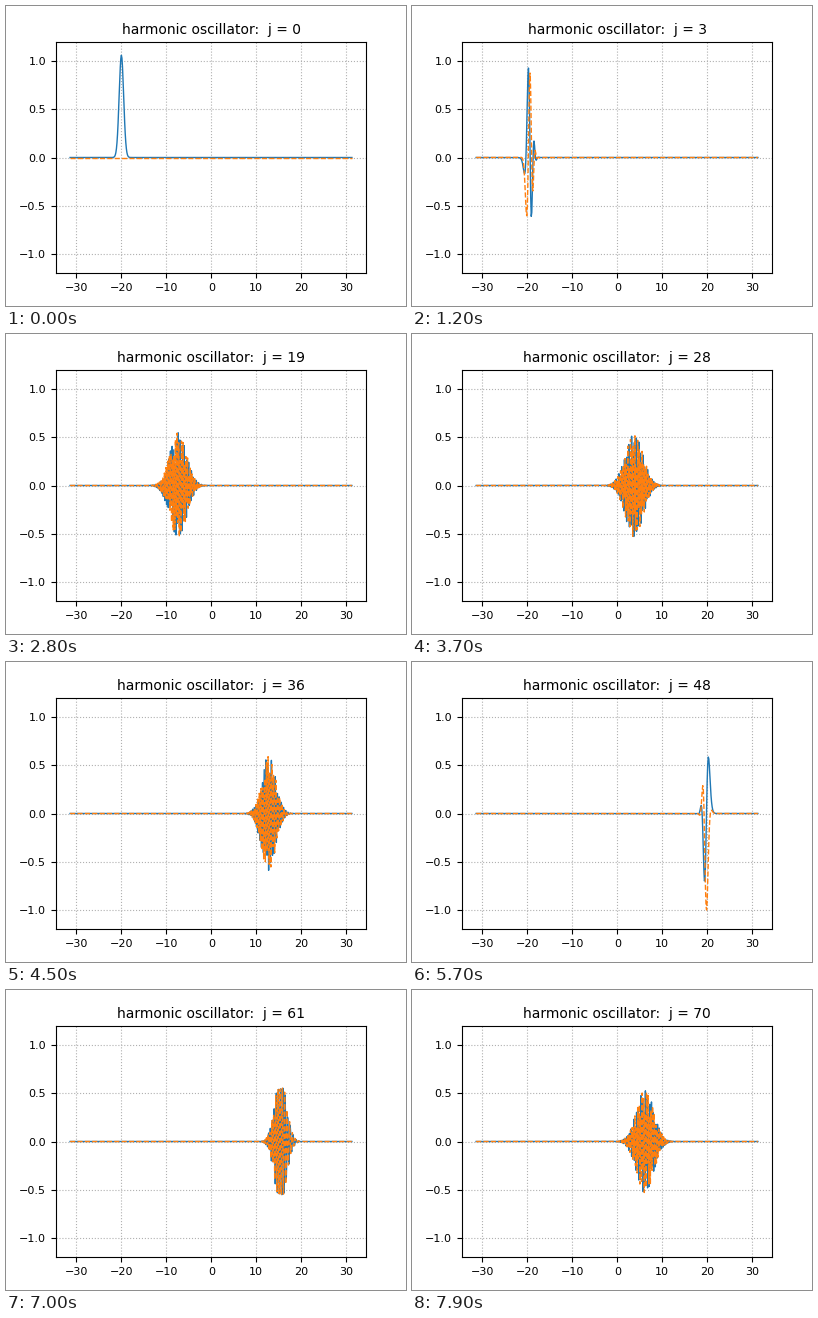
These frames come from a looping animation (400 px wide and 300 px high, 8 s). A matplotlib script:

```python
import numpy as np
import matplotlib.pyplot as plt
from matplotlib.animation import FuncAnimation

FRAMES = 80
INTERVAL = 100      # ms
HOLD = 9            # extra frames spent on the initial state
DT = 2 * np.pi / 100

N = 512
LENGTH = 20 * np.pi
X0 = -20.0          # initial centre of the packet
A0 = 4.0            # initial inverse squared width

x = LENGTH / N * (np.arange(N) - N // 2)


def packet(t):
    """Gaussian packet moving in the potential x**2 / 2 (hbar = m = 1)."""
    c, s = np.cos(t), np.sin(t)
    q, p = X0 * c, -X0 * s
    action = -X0 ** 2 * np.sin(2 * t) / 4
    spread = c + 1j * A0 * s
    width = (A0 * c + 1j * s) / spread
    # Factoring out exp(it) keeps the square root on one branch.
    root = np.exp(0.5j * t) * np.sqrt(spread * np.exp(-1j * t))
    amp = (A0 / np.pi) ** 0.25 / root
    return amp * np.exp(-width * (x - q) ** 2 / 2 + 1j * (p * (x - q) + action))


fig, ax = plt.subplots(figsize=(4, 3), dpi=100)
psi = packet(0.0)
real_line, = ax.plot(x, psi.real, lw=1)
imag_line, = ax.plot(x, psi.imag, "--", lw=1)
ax.set_ylim(-1.2, 1.2)
ax.grid(linestyle=":")
ax.tick_params(labelsize=8)
title = ax.set_title("harmonic oscillator:  j = 0", fontsize=10)


def update(frame):
    j = max(0, frame - HOLD)
    psi = packet(j * DT)
    real_line.set_ydata(psi.real)
    imag_line.set_ydata(psi.imag)
    title.set_text(f"harmonic oscillator:  j = {j}")
    return real_line, imag_line, title


anim = FuncAnimation(fig, update, frames=FRAMES, interval=INTERVAL, repeat=True)

plt.show()
```
